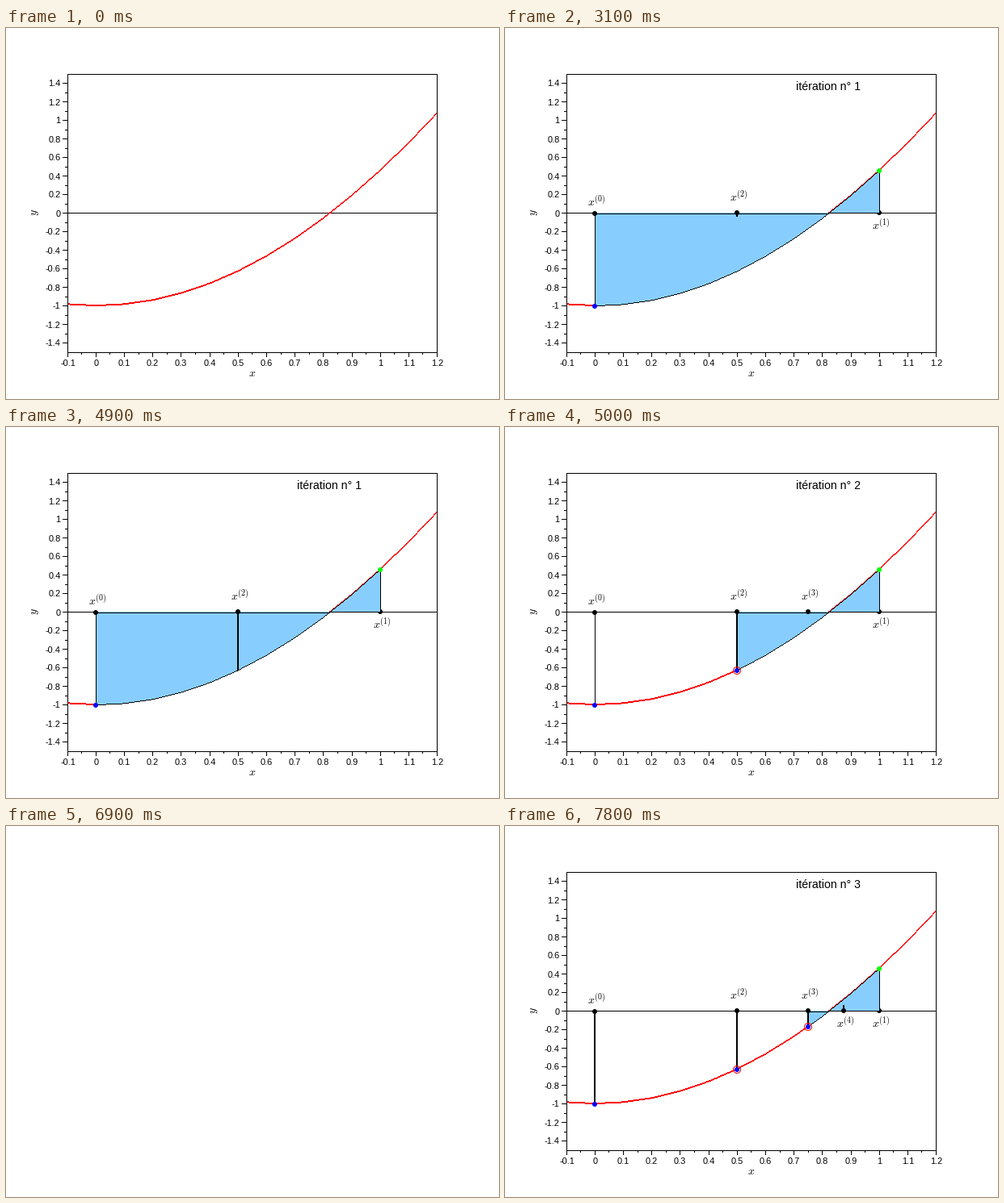
Animation, 610 px wide and 460 px high, one loop 8000 ms. Source, as a matplotlib script:

```python
import math

import matplotlib.pyplot as plt
import numpy as np
from matplotlib.animation import FuncAnimation
from matplotlib.patches import Circle, Rectangle

plt.rcParams["font.family"] = "Liberation Sans"
plt.rcParams["mathtext.fontset"] = "cm"

W, H, DPI = 610, 460, 80
PT = 72 / DPI  # points per pixel
LEFT, RIGHT, TOP, BOTTOM = 76, 533, 57, 402
AXIS_Y, AXIS_ROW = 229.6, 229
STEPS = 19
BLANK = 69
ROOT = 0.8241
SKY = (135 / 255, 206 / 255, 1)

# Bisection stages: first frame, interval start, midpoint under test
STAGES = [(15, 0, None), (31, 0, 0.5), (50, 0.5, 0.75), (70, 0.75, 0.875)]
POINTS = [0, 1, 0.5, 0.75, 0.875]
LABEL_Y = [222, 251, 216, 216, 251]
SAMPLES = np.arange(-1, 13) / 10

fig = plt.figure(figsize=(W / DPI, H / DPI), dpi=DPI, facecolor="white")
ax = fig.add_axes([0, 0, 1, 1])
ax.set(xlim=(0, W), ylim=(H, 0))
ax.axis("off")


def f(x):
    return x**2 - np.cos(x)


def px(x):
    return 111.3 + 351.9 * x


def py(y):
    return AXIS_Y - 115 * y


def bar(x, y, w, h, z=3):
    """Black axis-parallel stroke given in whole pixels."""
    return ax.add_patch(Rectangle((x, y), w, h, fc="black", ec="none", zorder=z))


def curve_rows(a, b):
    """Column edges and pixel rows of the sampled curve on [a, b]."""
    edges = np.arange(math.floor(px(a)), math.floor(px(b)) + 2)
    ys = np.interp(edges[:-1] + .5, px(SAMPLES), py(f(SAMPLES)))
    return edges, np.floor(ys)


def curve(a, b, width, color, z):
    edges, rows = curve_rows(a, b)
    return ax.stairs(rows + 1, edges, baseline=rows + 1 - width, fill=True,
                     color=color, lw=0, zorder=z)


def area(a, b):
    edges, rows = curve_rows(a, b)
    return ax.stairs(rows, edges, baseline=np.full_like(rows, AXIS_ROW), fill=True,
                     color=SKY, lw=0, zorder=2)


def text(x, y, s, size, ha="left", **kw):
    kw.setdefault("va", "baseline")
    return ax.text(x, y, s, fontsize=size * PT, ha=ha, zorder=6, **kw)


def dot(x, y, color, z=5):
    return ax.add_patch(Circle((round(px(x)), y), 3, fc=color, ec="none", zorder=z))


def ring(x):
    return ax.add_patch(Circle((round(px(x)), round(py(f(x)))), 4.5, fill=False,
                               ec="red", lw=PT, zorder=4))


def stem(x, end, width=2):
    """Vertical stroke from the axis to pixel row `end`."""
    left = math.floor(px(x)) + 1 - width
    return bar(left, AXIS_ROW, width, end - AXIS_ROW + (end > AXIS_ROW))


def draw_axes():
    wide, tall = RIGHT - LEFT + 1, BOTTOM - TOP + 1
    for y in (TOP, AXIS_ROW, BOTTOM):
        bar(LEFT, y, wide, 1, 1)
    for x in (LEFT, RIGHT):
        bar(x, TOP, 1, tall)
    for k in range(-2, 25):
        major = k % 2 == 0
        bar(math.floor(px(k / 20)), BOTTOM, 1, 6 if major else 3)
        if major:
            text(math.floor(px(k / 20)) + .5, 419, f"{k / 20:g}", 11, "center")
    for k in range(-14, 15):
        row, major = math.floor(py(k / 10)), k % 2 == 0
        size = 6 if major else 3
        bar(LEFT - size, row, size, 1)
        if major:
            text(67.5, row + 4.5, f"{k / 10:g}", 11, "right")
    text(305, 432.5, "$x$", 14, "center")
    text(36, 228.5, "$y$", 14, "center", va="center", rotation=90)
    curve(-0.1, 1.2, 2, "red", 1.2)


def draw_stage(index, step):
    _, a, mid = STAGES[index]
    left = math.floor(px(a))
    parts = [text(360, 77, f"itération n° {index}", 14.2),
             area(a, 1),
             curve(a, 1, 1, "black", 2.5),
             bar(left, AXIS_ROW + 1, math.floor(px(ROOT)) - left, 1),
             stem(1, math.floor(py(f(1))), 1),
             dot(1, AXIS_ROW, "black", 1.5),
             dot(1, round(py(f(1))), "lime")]
    for i in range(index + 2):
        parts.append(text(px(POINTS[i]) - 9, LABEL_Y[i], f"$x^{{({i})}}$", 14.2))

    for x in [p for p in POINTS if p <= a]:
        width = 2 if x or index == 3 else 1
        parts += [stem(x, math.floor(py(f(x))), width),
                  dot(x, AXIS_ROW if x else AXIS_ROW + 1, "black"),
                  dot(x, round(py(f(x))), "blue")]
        if x:
            parts.append(ring(x))

    if mid is not None:
        parts += [stem(mid, math.floor(py(f(mid) * step / STEPS))),
                  dot(mid, AXIS_ROW, "black")]
    return parts


draw_axes()
moving = []


def update(frame):
    while moving:
        moving.pop().remove()
    ax.set_visible(frame != BLANK)
    index = sum(frame >= start for start, *_ in STAGES) - 1
    if index >= 0:
        step = min(frame - STAGES[index][0] + 1, STEPS)
        moving.extend(draw_stage(index, step))
    return moving


anim = FuncAnimation(fig, update, frames=80, interval=100, init_func=lambda: [],
                     repeat=True, repeat_delay=0, blit=False)
plt.show()
```
